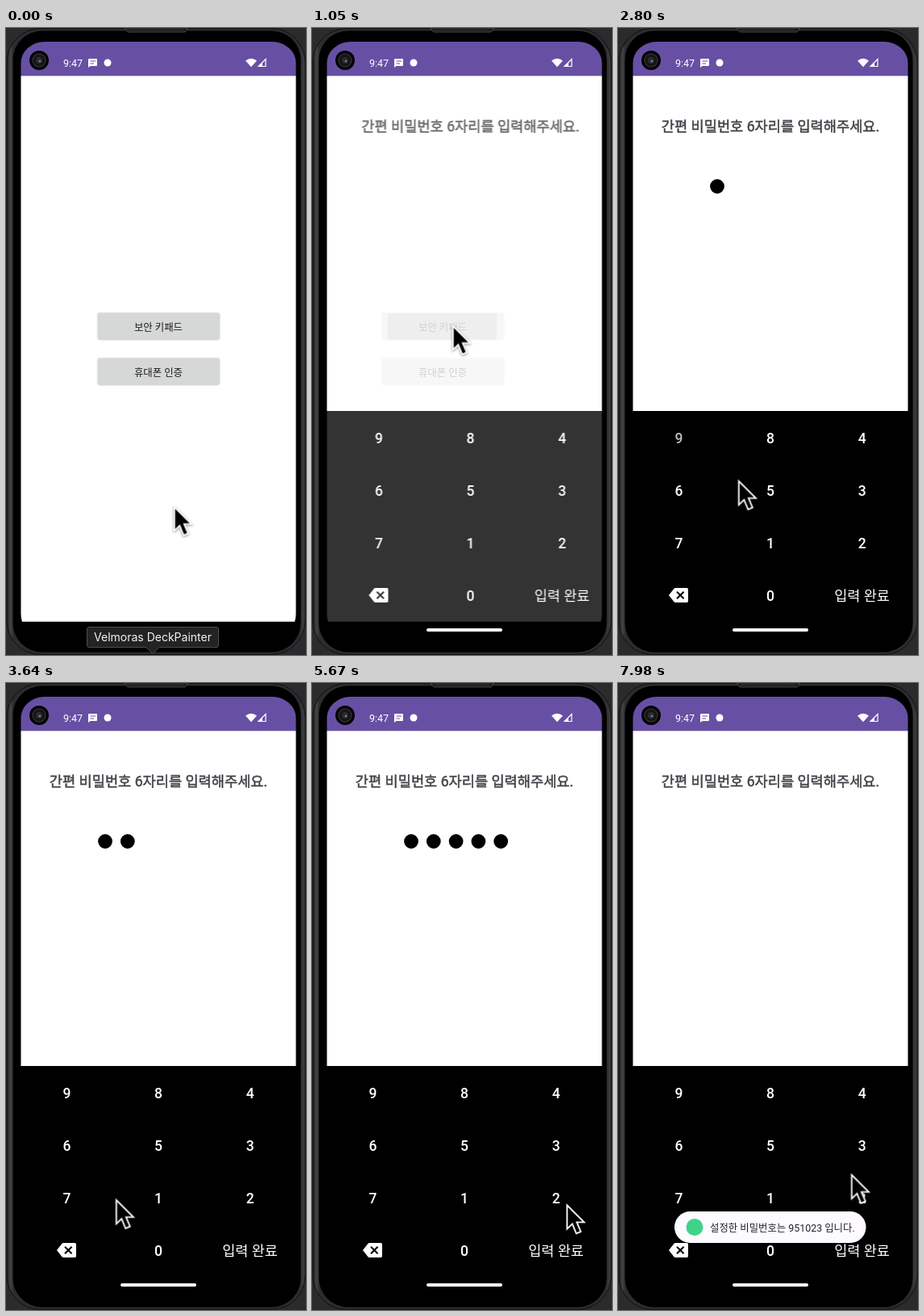
Write an HTML page that moves like this. It is 372x776 px and loops after 8000 ms.

```html
<!DOCTYPE html>
<html lang="ko">
<head>
<meta charset="utf-8">
<title>Keypad demo</title>
<style>
html, body { margin: 0; width: 100%; height: 100%; overflow: hidden; background: #2b2b2d; }
svg { display: block; width: 372px; height: 776px; }
text { font-family: Roboto, "Noto Sans CJK KR", "Noto Sans CJK", sans-serif; }
.mid { text-anchor: middle; }
.btn text { font-size: 12.4px; fill: #1c1b1f; }
.btn rect { fill: #d6d7d7; filter: drop-shadow(0 .6px 1px #0005); }
.btn .ripple { fill: #000; filter: none; opacity: 0; }
.title { font-size: 17.6px; fill: #454149; stroke: #454149; stroke-width: .5px; }
.keys text { font-size: 17.5px; font-weight: 500; fill: #fff; }
.keys .done { font-weight: 400; }
.toast text { font-size: 12.4px; fill: #222; }
.tip text { font: 14px Inter, sans-serif; fill: #f2f2f2; }

.home, .ripple, .exit, .enter, .slide, .cover, .key9, .key5, .toast, .tip, .cursor {
  animation: 8s linear infinite;
}
.home { animation-name: home; animation-timing-function: step-end; }
.ripple { animation-name: ripple; }
.exit { animation-name: exit; }
.enter { animation-name: enter; }
.slide { animation-name: slide; }
.cover { animation-name: cover; animation-timing-function: step-end; }
.key9 { animation-name: key9; }
.key5 { animation-name: key5; }
.toast { animation-name: toast; transform-origin: 188.5px 674px; }
.tip { animation-name: tip; animation-timing-function: step-end; }
.cursor { animation-name: cursor; }

@keyframes tip { 0% { opacity: 1 } .87%, 100% { opacity: 0 } }
@keyframes home { 0% { opacity: 1 } 14.4%, 100% { opacity: 0 } }
@keyframes ripple { 0%, 7.5% { opacity: 0 } 10%, 100% { opacity: .2 } }
@keyframes exit {
  0%, 10.5% { transform: none }
  13.125% { transform: translateX(-27px); animation-timing-function: ease-out }
  17.3%, 100% { transform: translateX(-34px) }
}
@keyframes enter {
  0%, 10.5% { opacity: 0 }
  13.125% { opacity: .8 }
  14.3%, 100% { opacity: 1 }
}
@keyframes slide {
  0%, 10.5% { transform: translateX(34px) }
  13.125% { transform: translateX(7.5px); animation-timing-function: ease-out }
  17.3%, 100% { transform: none }
}
@keyframes cover {
  0% { transform: none }
  27.1% { transform: translateX(27.8px) }
  35.8% { transform: translateX(55.6px) }
  48.1% { transform: translateX(83.4px) }
  60.3% { transform: translateX(111.2px) }
  66.4% { transform: translateX(139px) }
  81.3% { transform: translateX(170px) }
  90.1%, 100% { transform: none }
}
@keyframes key9 { 0%, 34% { opacity: 1 } 34.6%, 35.4% { opacity: .75 } 36.5%, 100% { opacity: 1 } }
@keyframes key5 { 0%, 82.5% { opacity: 1 } 83.3%, 84.2% { opacity: .65 } 85.8%, 100% { opacity: 1 } }
@keyframes toast {
  0%, 90.5% { opacity: 0; transform: scale(.9) }
  92.7%, 100% { opacity: 1; transform: none }
}
@keyframes cursor {
  0%, .8% { transform: translate(208px, 592px) }
  3% { transform: translate(205px, 440px) }
  4.6% { transform: translate(184px, 286px) }
  6.125%, 13.8% { transform: translate(174px, 368px) }
  17.4%, 18.3% { transform: translate(46px, 418px) }
  19.2% { transform: translate(70px, 450px) }
  21.5% { transform: translate(148px, 490px) }
  25.375%, 28.7% { transform: translate(36px, 528px) }
  34.9%, 35.7% { transform: translate(149px, 560px) }
  36.75%, 37.7% { transform: translate(168px, 569px) }
  40.5% { transform: translate(254px, 509px) }
  44% { transform: translate(78px, 600px) }
  46.4%, 49% { transform: translate(170px, 662px) }
  53% { transform: translate(241px, 701px) }
  56.8%, 57.6% { transform: translate(233px, 690px) }
  57.75% { transform: translate(224px, 656px) }
  58.625%, 61% { transform: translate(156px, 711px) }
  64.75%, 67.5% { transform: translate(316px, 645px) }
  70% { transform: translate(338px, 673px) }
  73% { transform: translate(262px, 580px) }
  76.1% { transform: translate(190px, 600px) }
  77% { transform: translate(172px, 607px) }
  78.3% { transform: translate(215px, 509px) }
  79.6%, 82% { transform: translate(283px, 580px) }
  83.9%, 84.7% { transform: translate(265px, 620px) }
  86% { transform: translate(280px, 690px) }
  87.5%, 91% { transform: translate(305px, 716px) }
  94% { transform: translate(338px, 600px) }
  96.5% { transform: translate(310px, 514px) }
  99.6%, 100% { transform: translate(289px, 608px) }
}
</style>
</head>
<body>
<svg viewBox="0 0 372 776">
  <defs>
    <linearGradient id="edge">
      <stop offset="0" stop-color="#1c1c1e"/>
      <stop offset=".012" stop-color="#444446"/>
      <stop offset=".022" stop-color="#2c2c2e"/>
      <stop offset=".98" stop-color="#2c2c2e"/>
      <stop offset="1" stop-color="#404042"/>
    </linearGradient>
    <clipPath id="screen">
      <path d="M18.500 725V43A30 26 0 0 1 48 17H330A30 26 0 0 1 359.500 43V725Q359.500 731 358 734.700H20Q18.500 731 18.500 725Z"/>
    </clipPath>
  </defs>

  <!-- phone body -->
  <rect width="372" height="776" fill="#2b2b2d"/>
  <rect x="1" y=".5" width="370" height="775" rx="42" fill="url(#edge)" stroke="#101011"/>
  <rect x="8.500" y="3.500" width="357" height="769" rx="36"/>
  <path d="M147 0H226L222 5H151Z" fill="#1a1a1b" stroke="#48484a"/>
  <path d="M153 2.500H220" stroke="#555" stroke-dasharray="1 1.500"/>

  <g clip-path="url(#screen)">
    <g class="home">
      <path d="M18 59H360V735H18Z" fill="#fff"/>
      <g class="exit btn">
        <rect x="114" y="353" width="150.500" height="32.500" rx="2"/>
        <rect class="ripple" x="121" y="353" width="135" height="32.500"/>
        <text class="mid" x="189" y="374.500">보안 키패드</text>
        <rect x="114" y="409" width="150.500" height="32.500" rx="2"/>
        <text class="mid" x="189" y="430.500">휴대폰 인증</text>
      </g>
    </g>

    <g class="enter">
      <path d="M18 59H360V474H18Z" fill="#fff"/>
      <path d="M18 474H360V735H18Z"/>
      <g class="slide">
        <text class="title mid" x="189" y="128">간편 비밀번호 6자리를 입력해주세요.</text>
        <path d="M123 196h140" stroke="#000" stroke-width="17.800" stroke-linecap="round" stroke-dasharray="0 27.800"/>
        <rect class="cover" x="109" y="184" width="172" height="24" fill="#fff"/>
        <g class="keys mid">
          <text x="75.400" y="514" class="key9">9</text>
          <text x="189" y="514">8</text>
          <text x="302.700" y="514">4</text>
          <text x="75.400" y="579">6</text>
          <text x="189" y="579" class="key5">5</text>
          <text x="302.700" y="579">3</text>
          <text x="75.400" y="644">7</text>
          <text x="189" y="644">1</text>
          <text x="302.700" y="644">2</text>
          <path d="M63 702L69.500 693.800Q70.200 693 71 693H85.300Q87 693 87 694.700V709.300Q87 711 85.300 711H71Q70.200 711 69.500 710.200Z" fill="#fff"/>
          <path d="M73 697.700l8.600 8.600m0-8.600l-8.600 8.600" stroke="#000" stroke-width="2"/>
          <text x="189" y="709">0</text>
          <text class="done" x="302.500" y="709">입력 완료</text>
        </g>
      </g>
    </g>

    <!-- status bar -->
    <rect x="18" y="17" width="342" height="42.300" fill="#6750a4"/>
    <g fill="#fff">
      <text x="71" y="47.500" font-size="12.500">9:47</text>
      <path d="M103 38h9q1 0 1 1v7q0 1-1 1h-7.500l-2.500 2v-10q0-1 1-1Z"/>
      <path d="M104.500 41h6.500M104.500 44h4.500" stroke="#6750a4" stroke-width="1.200"/>
      <circle cx="126" cy="43" r="4.500"/>
      <path d="M297 40.500Q304 34.800 311 40.500L304 48.300Z"/>
      <path d="M322 38.500V47.500H313Z" fill="none" stroke="#fff" stroke-width="1.200"/>
      <path d="M318 42.500V47.500H313Z"/>
    </g>
    <circle cx="41" cy="40" r="12"/>
    <circle cx="41" cy="40" r="8" fill="#151517" stroke="#2e2e31" stroke-width="1.500"/>
    <circle cx="41" cy="40" r="4" fill="#2c2c30"/>
    <circle cx="42" cy="41" r="1.300" fill="#85858a"/>
  </g>

  <rect x="142" y="743" width="94" height="4" rx="2" fill="#fff"/>

  <g class="toast">
    <rect x="70" y="654" width="237.500" height="39" rx="19.500" fill="#fdfbff"/>
    <circle cx="95" cy="673.500" r="10.500" fill="#3fd38a"/>
    <text x="114" y="678.500">설정한 비밀번호는 951023 입니다.</text>
  </g>

  <g class="tip">
    <path d="M103 741.500H261Q263.500 741.500 263.500 744V764Q263.500 766.500 261 766.500H190L182 774.500L174 766.500H103Q100.500 766.500 100.500 764V744Q100.500 741.500 103 741.500Z" fill="#222324" stroke="#4c4c4e"/>
    <text class="mid" x="182" y="759">Velmoras DeckPainter</text>
  </g>

  <g class="cursor">
    <path transform="translate(.8 .8) scale(1.03)" d="M0 0V28.500L6.300 22.400L11.100 34L16.500 31.700L11.700 20.500H20.500Z" stroke="#fff" stroke-width="1.800" style="filter: drop-shadow(0 1px 1.500px #0007)"/>
  </g>
</svg>
</body>
</html>
```
